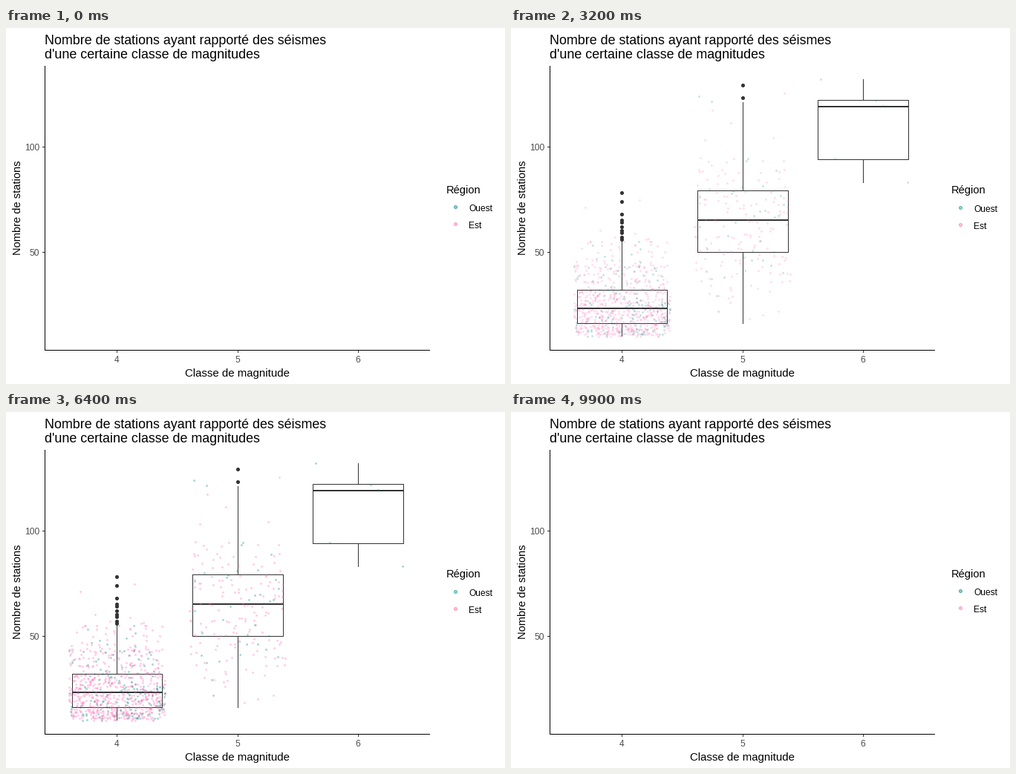
A matplotlib script that plays this animation: 672 by 480 pixels, repeating every 10 s.

```python
import numpy as np
import matplotlib.pyplot as plt
from matplotlib.animation import FuncAnimation
from matplotlib.collections import LineCollection
from matplotlib.colors import to_rgb

W, H, DPI = 672, 480, 96
PX = 72 / DPI  # one pixel in points
FRAMES, STEP = 100, 100
TEAL, PINK, DARK = "#008080", "#ff69b4", "#333333"

plt.rcParams["font.family"] = "Liberation Sans"
fig = plt.figure(figsize=(W / DPI, H / DPI), dpi=DPI, facecolor="white")
ax = fig.add_axes([0, 0, 1, 1])
ax.set_xlim(0, W)
ax.set_ylim(H, 0)
ax.axis("off")


def px(k):
    return 312.3 + 162.4 * (k - 5)


def py(v):
    return 444.3 - 2.84 * np.asarray(v, float)


def snap(a):
    """Centre of the pixel that holds a."""
    return np.floor(a) + 0.5


def label(x, y, s, size, color="black", **kw):
    return ax.text(x, y, s, fontsize=size * PX, color=color, va="baseline", **kw)


def line(xs, ys, color):
    ax.plot(xs, ys, color=color, lw=PX, solid_capstyle="butt", snap=False)


def tint(colors):
    return np.array([(*to_rgb(c), 1) for c in colors])


def style(dots, rgba, scale=1, fade=1, face=0.4, edge=0.6):
    """Set size and opacity of a set of outlined dots."""
    dots.set_sizes([(4 * scale * PX) ** 2])
    dots.set_linewidths([PX * scale])
    for setter, a in ((dots.set_facecolor, face), (dots.set_edgecolor, edge)):
        c = rgba.copy()
        c[:, 3] = a * fade
        setter(c)


# Titles and axes
label(52, 22, "Nombre de stations ayant rapporté des séismes", 17.87)
label(52, 41, "d'une certaine classe de magnitudes", 17.87)
label(311.7, 470, "Classe de magnitude", 15, ha="center")
label(20, 242.5, "Nombre de stations", 14.67, ha="center", rotation=90,
      rotation_mode="anchor")

for v in (50, 100):
    y = snap(py(v))
    line([49, 52], [y, y], DARK)
    label(45, y + 4.5, str(v), 12, "#4d4d4d", ha="right")
for k in (4, 5, 6):
    x = snap(px(k))
    line([x, x], [435, 438], DARK)
    label(x - 0.5, 451, str(k), 12, "#4d4d4d", ha="center")
line([52.5, 52.5], [51, 435], "black")
line([52, 571], [434.5, 434.5], "black")

# Legend
label(593, 223, "Région", 14.67)
keys = ax.scatter([605.5, 605.5], [241.5, 264.5])
key_text = [label(623.5, 247, "Ouest", 12), label(623.5, 270, "Est", 12)]
KEY_IDLE = tint([TEAL, PINK])
KEY_LIVE = tint(["#00968c", "#ff6ea0"])

# Box plots: low whisker, quartiles, high whisker
BOXES = {
    4: (10, 16, 23, 32, 56),
    5: (16, 50, 65, 79, 121),
    6: (83, 94, 119, 122, 132),
}
OUTLIERS = {4: (56, 57, 59, 60, 62, 64, 65, 68, 74, 78), 5: (123, 129)}

thin = LineCollection([], linewidths=PX, zorder=3, capstyle="projecting")
thick = LineCollection([], linewidths=2 * PX, zorder=3, capstyle="butt")
for coll in (thin, thick):
    coll.set_snap(False)
    ax.add_collection(coll)
out_xy = np.array([(snap(px(k)), snap(py(v)))
                   for k, vs in OUTLIERS.items() for v in vs])
outliers = ax.scatter(*out_xy.T, zorder=4)
OUT_RGBA = tint([DARK] * len(out_xy))

# Jittered stations, drawn from the quantiles of each class
rng = np.random.default_rng(11)


def cloud(k, n, probs, values):
    v = np.round(np.interp(rng.random(n), probs, values))
    x = px(k + rng.uniform(-0.4, 0.4, n))
    return np.column_stack([x, py(v + rng.uniform(-0.4, 0.4, n))])


spots = np.vstack([
    cloud(4, 802, [0, 0.25, 0.5, 0.75, 0.93, 0.99, 1], [10, 16, 23, 32, 45, 57, 78]),
    cloud(5, 193, [0, 0.07, 0.25, 0.5, 0.75, 0.91, 1], [16, 36, 50, 65, 79, 95, 129]),
])
hues = np.where(rng.random(len(spots)) < 0.2, TEAL, PINK)
strong = [(417, 69), (491, 98), (501, 105), (436, 176), (534, 208)]
spots = np.vstack([spots, strong])
ST_RGBA = tint([*hues, *[TEAL] * len(strong)])
stations = ax.scatter(*snap(spots).T, zorder=5)


def presence(t, start, end):
    """Linear entry after start and linear exit after end, 1500 ms each."""
    return float(np.clip(min((t - start) / 1500, 1 - (t - end) / 1500), 0, 1))


def box_lines(grow):
    """Outlines, whiskers and medians, grown out of the median."""
    edges, medians = [], []
    for k, stats in BOXES.items():
        mid = stats[2]
        lo, q1, m, q3, hi = snap(py([mid + (s - mid) * grow for s in stats]))
        left, c, right = snap(px(k) + np.array([-60.75, 0, 60.75]))
        edges += [[(left, q1), (left, q3), (right, q3), (right, q1), (left, q1)],
                  [(c, q1), (c, lo)], [(c, q3), (c, hi)]]
        medians.append([(left, m - 0.5), (right, m - 0.5)])
    return edges, medians


def update(i):
    t = i * STEP
    box = presence(t, 0, 8400)
    for coll, segs in zip((thin, thick), box_lines(box)):
        coll.set_segments(segs)
        coll.set_color([(*to_rgb(DARK), box)])
        coll.set_visible(box > 0)
    style(outliers, OUT_RGBA, 1, box, 1, 1)
    outliers.set_visible(box > 0)

    # The dot radius steps in whole pixels while opacity runs smoothly
    dots = presence(t, 2500, 6000)
    style(stations, ST_RGBA, 1 if dots > 0.83 else 0.5, dots)
    stations.set_visible(dots > 0)

    shift = int(box > 0)
    style(keys, KEY_LIVE if shift else KEY_IDLE)
    keys.set_offsets([(605.5, 241.5 + shift), (605.5, 264.5 + shift)])
    for txt, y in zip(key_text, (247, 270)):
        txt.set_y(y + shift)
    return thin, thick, outliers, stations, keys, *key_text


anim = FuncAnimation(fig, update, frames=FRAMES, interval=STEP,
                     repeat=True, repeat_delay=0, blit=False)
plt.show()
```
